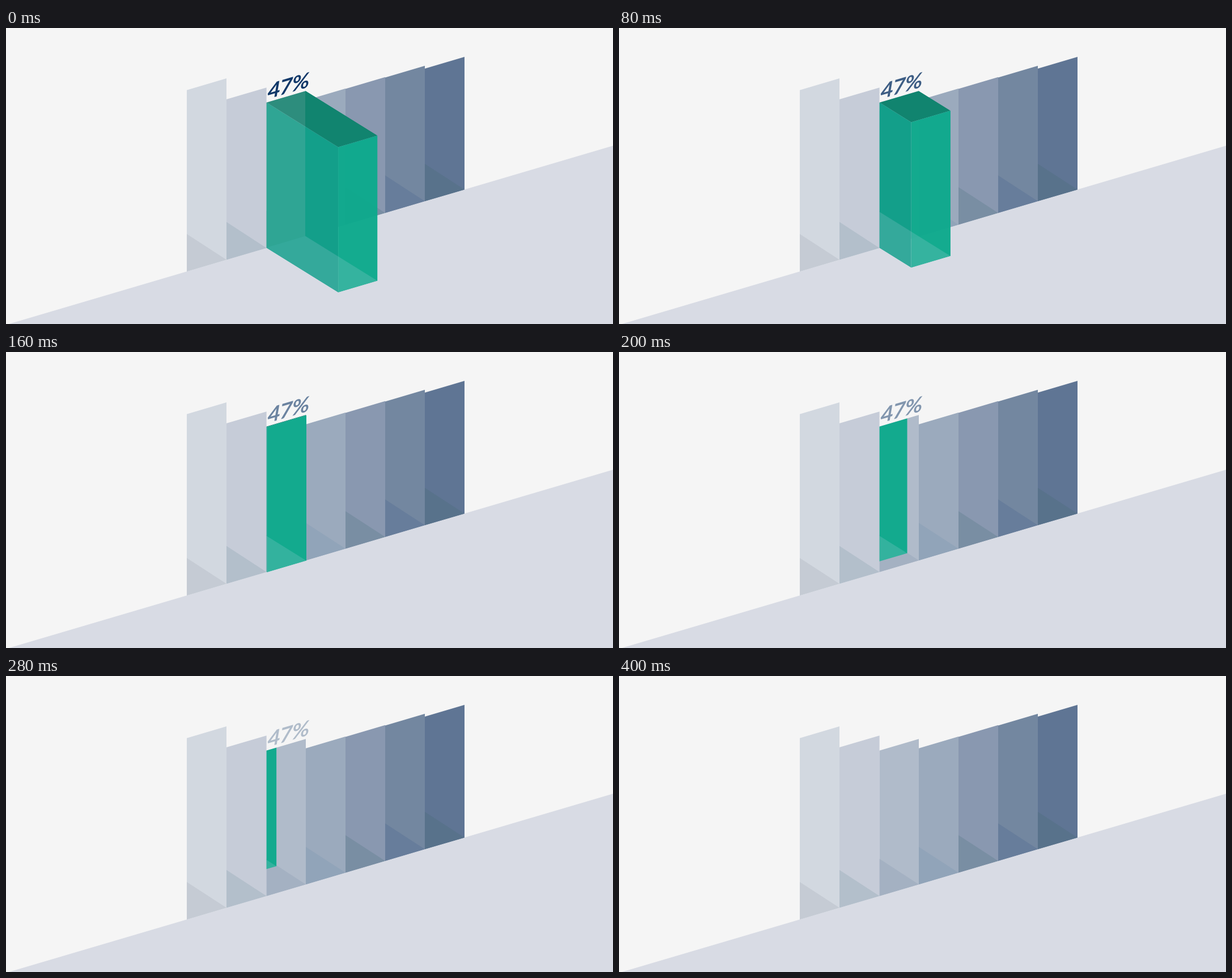
An HTML page with a canvas that plays this animation: 1071x523 px, repeating every 0.42 s.

```html
<!DOCTYPE html>
<html lang="en">
<head>
<meta charset="utf-8">
<title>Bar chart</title>
<style>
  html, body { margin: 0; width: 100%; height: 100%; overflow: hidden; background: #f5f5f5; }
  canvas { display: block; }
</style>
</head>
<body>
<canvas id="stage" width="1071" height="523"></canvas>
<script>
const ctx = document.getElementById('stage').getContext('2d');
const STEP = 20, STEPS = 21;
const RISE = -0.2955;   // slope of the floor line and bar tops
const SLIDE = 0.622;    // slope of the direction the box travels
const DEPTH = 127.5;

const floorY = x => 523 + RISE * (x - 5);

const edges = [319, 389, 459.6, 529, 599, 669, 739, 809];
const bars = [
  { top: 109.7, fill: '#d2d8e0', shade: '#c5cbd4' },
  { top: 126, fill: '#c6ccd8', shade: '#b3bfcb' },
  { top: 131.7, fill: '#b0bbca', shade: '#a4b1c2' },
  { top: 127.7, fill: '#9baabd', shade: '#91a4b9' },
  { top: 107.5, fill: '#8998b0', shade: '#798ea3' },
  { top: 87.5, fill: '#7387a0', shade: '#677d9b' },
  { top: 71.7, fill: '#5f7594', shade: '#58728b' }
];

function trace(points) {
  ctx.beginPath();
  points.forEach(([x, y]) => ctx.lineTo(x, y));
  ctx.closePath();
}

function poly(fill, ...points) {
  trace(points);
  ctx.fillStyle = fill;
  ctx.fill();
}

function corners(i) {
  const l = edges[i], r = edges[i + 1], top = bars[i].top;
  return {
    tl: [l, top],
    tr: [r, top + RISE * (r - l)],
    br: [r, floorY(r)],
    bl: [l, floorY(l)]
  };
}

function drawBar(bar, i) {
  const { tl, tr, br, bl } = corners(i);
  poly(bar.fill, tl, tr, br, bl);
  poly(bar.shade, [bl[0], br[1] - 0.65 * (br[0] - bl[0])], br, bl);
}

function drawBox(d) {
  const win = corners(2);
  const shift = by => {
    const face = {};
    for (const key in win) face[key] = [win[key][0] + by, win[key][1] + by * SLIDE];
    return face;
  };
  const front = shift(d), back = shift(d - DEPTH);

  ctx.save();
  // Only the part past the chart plane, or seen through the bar, is visible.
  trace(d > 0
    ? [win.tl, win.tr, front.tr, front.br, front.bl, win.bl]
    : [win.tl, win.tr, win.br, win.bl]);
  ctx.clip();
  poly('#11846f', back.tl, back.tr, front.tr, front.tl);
  poly('#139f8a', back.tl, front.tl, front.bl, back.bl);
  poly('rgba(14,170,141,.97)', front.tl, front.tr, front.br, front.bl);
  poly('rgba(240,205,220,.12)', back.tl, back.tr, back.br, back.bl);
  poly('rgba(250,228,250,.14)', back.bl, back.br, front.br, front.bl);
  ctx.restore();
}

function drawLabel(alpha) {
  ctx.save();
  ctx.globalAlpha = alpha;
  ctx.transform(1, RISE, -0.17, 1, 460, 126);
  ctx.font = '700 38px Lato, sans-serif';
  ctx.letterSpacing = '-0.8px';
  ctx.fillStyle = '#0f3768';
  ctx.fillText('47%', 0, 0);
  ctx.restore();
}

function draw(step) {
  const left = 1 - step / (STEPS - 1);
  ctx.fillStyle = '#f5f5f5';
  ctx.fillRect(0, 0, 1071, 523);
  poly('#d8dbe4', [5, 523], [1071, floorY(1071)], [1071, 523]);
  bars.forEach(drawBar);
  if (step < STEPS - 1) drawBox(196 * left * left - 69.5);
  drawLabel(step < 3 ? 1 : left);
}

const start = performance.now();
function tick() {
  draw(Math.floor((performance.now() - start) / STEP) % STEPS);
  requestAnimationFrame(tick);
}
tick();
</script>
</body>
</html>
```
